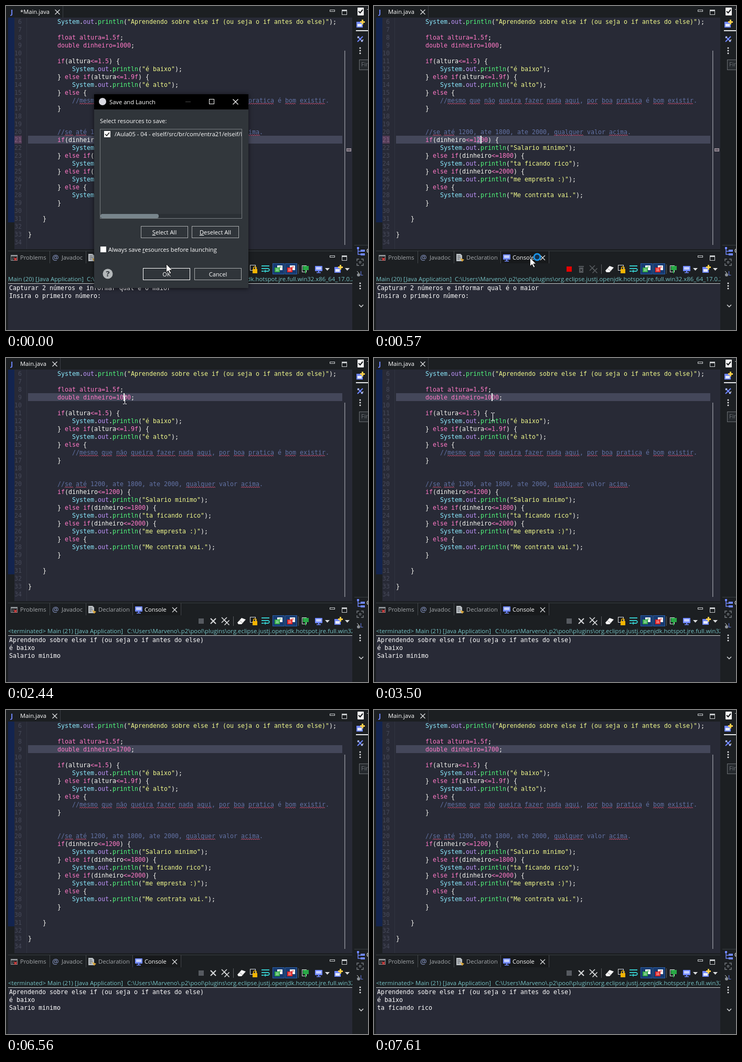
Write an HTML page that moves like this. It is 690x617 px and loops after 8000 ms.

```html
<!DOCTYPE html>
<html lang="pt">
<head>
<meta charset="utf-8">
<title>Editor</title>
<style>
html, body { margin: 0; width: 100%; height: 100%; overflow: hidden; background: #1c1f22; }
svg { display: block; }
text { font: 11.2px "Open Sans", "Noto Sans", sans-serif; white-space: pre; }
.mono { font: 11.63px "DejaVu Sans Mono", "Noto Sans Mono", monospace; }
.path { font-size: 11.35px; }
</style>
</head>
<body>
<svg id="stage" width="690" height="617" viewBox="0 0 690 617"></svg>
<script>
(() => {
const LOOP = 8000, COL = 7, ROW = 15, CODE_X = 42, FIRST = 6;
const C = {
  bg: '#282a36', frame: '#1c1f22', line: '#44475a', text: '#f8f8f2', pink: '#ff79c6',
  cyan: '#8be9fd', purple: '#bd93f9', green: '#50fa7b', yellow: '#f1fa8c',
  comment: '#6272a4', white: '#ffffff', grey: '#a4a8ab', blue: '#7088ff'
};

// ---- drawing helpers
const esc = s => s.replace(/&/g, '&amp;').replace(/</g, '&lt;');
const rect = (x, y, w, h, fill, more = '') =>
  `<rect x="${x}" y="${y}" width="${w}" height="${h}" fill="${fill}" ${more}/>`;
const box = (x, y, w, h, stroke, fill = 'none') =>
  rect(x + .5, y + .5, w - 1, h - 1, fill, `stroke="${stroke}"`);
const line = (d, stroke, width = 1) =>
  `<path d="${d}" fill="none" stroke="${stroke}" stroke-width="${width}"/>`;
const shape = (d, fill, more = '') => `<path d="${d}" fill="${fill}" ${more}/>`;
const disc = (x, y, r, fill) => `<circle cx="${x}" cy="${y}" r="${r}" fill="${fill}"/>`;
const text = (x, y, s, fill = C.white, more = '') =>
  `<text x="${x}" y="${y}" fill="${fill}" ${more}>${esc(s)}</text>`;
const mono = (x, y, s, fill = C.white, more = '') => text(x, y, s, fill, 'class="mono" ' + more);
const at = (x, y, s) => `<g transform="translate(${x} ${y})">${s}</g>`;
const clip = (x, y, w, h, s) =>
  `<svg x="${x}" y="${y}" width="${w}" height="${h}" viewBox="${x} ${y} ${w} ${h}" overflow="hidden">${s}</svg>`;
const cross = (x, y, r, color, w = 1.2) =>
  line(`M${x - r} ${y - r}l${2 * r} ${2 * r}m0 ${-2 * r}l${-2 * r} ${2 * r}`, color, w);
const rowTop = n => 22 + (n - FIRST) * ROW;

// ---- code
const code = amount => [
  '        System.out.println("Aprendendo sobre else if (ou seja o if antes do else)");',
  '',
  '        float altura=1.5f;',
  `        double dinheiro=${amount};`,
  '',
  '        if(altura<=1.5) {',
  '            System.out.println("é baixo");',
  '        } else if(altura<=1.9f) {',
  '            System.out.println("é alto");',
  '        } else {',
  '            //mesmo que não queira fazer nada aqui, por boa pratica é bom existir.',
  '        }',
  '', '',
  '        //se até 1200, ate 1800, ate 2000, qualquer valor acima.',
  '        if(dinheiro<=1200) {',
  '            System.out.println("Salario minimo");',
  '        } else if(dinheiro<=1800) {',
  '            System.out.println("ta ficando rico");',
  '        } else if(dinheiro<=2000) {',
  '            System.out.println("me empresta :)");',
  '        } else {',
  '            System.out.println("Me contrata vai.");',
  '        }',
  '',
  '    }',
  '',
  '}',
  ''
];
const TOKENS = /("[^"]*")|(\/\/.*)|((?:float|double) \w+|\bif\b|\belse\b|<=|=|\d[\d.]*f?)|(System)|(out)|(println)|[^\s\w"]+|\w+/g;
const HUES = [C.yellow, C.comment, C.pink, C.cyan, C.purple, C.green];
const KNOWN = /^(é|ate|valor)$/;

function squiggles(s, start, y) {
  let out = '';
  for (const m of s.matchAll(/[a-zà-ú]+/g)) {
    if (KNOWN.test(m[0])) continue;
    const x = CODE_X + (start + m.index) * COL;
    out += line(`M${x} ${y}` + 'l2 -2l2 2'.repeat(Math.round(m[0].length * COL / 4)), '#d9557a', .9);
  }
  return out;
}

function codeLine(s, n) {
  let out = '';
  const y = rowTop(n) + 12;
  for (const m of s.matchAll(TOKENS)) {
    const hit = m.slice(1).findIndex(Boolean);
    if (hit === 1) out += squiggles(m[0], m.index, y + 3);
    out += mono(CODE_X + m.index * COL, y, m[0], HUES[hit] || C.text);
  }
  return out;
}

// ---- icons
const winButtons = y => box(617, y, 10, 4, '#c9ccce') +
  box(640, y, 10, 10, '#c9ccce') + rect(640, y, 10, 3, '#c9ccce');
const monitor = rect(-7, -6, 14, 10, C.blue, 'rx="1"') + rect(-5, -4, 10, 5, '#c5d0ff') +
  rect(-1, 4, 2, 2, C.blue) + rect(-4, 6, 8, 1.5, C.blue);
const newWindow = rect(-7, -4, 12, 11, C.blue) + rect(-5, 0, 8, 5, '#e8ecff') +
  shape('M3-8h3v3h3v3h-3v3h-3v-3h-3v-3h3z', '#ffcf4a');
const drop = shape('M-4-2h9l-4.5 5z', '#d8dadc');
const dots = y => [0, 5, 10].map(d => disc(675, y + d, 1.5, '#e4e6e8')).join('');
const printer = color => rect(-11, -11, 23, 21, '#173a70') + box(-11, -11, 23, 21, '#2b5fa8') +
  rect(-2, -7, 10, 9, '#f2f4f4') + rect(-7, -3, 10, 9, color) +
  line('M-5 0h6M-5 3h6', '#fff') + line('M1-4h5', color);

function consoleTools(live) {
  const dim = live ? '#55595d' : '#d6d8da';
  const bin = live ? shape('M-5-6h10v2h-10zM-4-3h8v10h-8z', dim) + line('M-2 0l4 4m0-4l-4 4', '#111')
                   : cross(0, 0, 5, dim, 2.2);
  return rect(367, 496, 10, 10, live ? '#e60000' : '#565a60') + at(395, 501, bin) +
    cross(416, 499, 5, dim, 1.7) + cross(421, 504, 4.5, dim, 1.7) +
    rect(433, 492, 1, 18, '#5b5f62') +
    at(449, 501, shape('M-8 3l8-9 8 3-8 9h-6z', '#f4f4f4') + line('M-4-1l7 5', '#999')) +
    at(472, 501, box(-7, -8, 11, 11, '#d8dadc') + rect(-2, 0, 9, 8, '#f4b400') +
      line('M0 0v-3q2.500-3 5 0v3', '#f4b400', 1.6)) +
    at(495, 501, line('M-8-6h15M-8-1h13q4 2.500 0 5h-6M-8 4h4', '#35c8c8', 1.8) + shape('M0 1v6l-4-3z', '#35c8c8')) +
    at(519, 501, printer('#2faa44')) + at(543, 501, printer('#e01f1f')) +
    rect(557, 492, 1, 18, '#5b5f62') +
    at(570, 501, box(-6, -7, 9, 13, '#d8dadc') + rect(-4, -6, 11, 8, '#28a745') + line('M1 2v6', '#28a745', 2)) +
    at(596, 501, monitor) + at(612, 501, drop) + at(633, 501, newWindow) + at(650, 501, drop);
}

// ---- regions
function sidebar() {
  return rect(664, 455, 26, 1, '#3a3e42') +
    rect(670, 3, 12, 15, '#f4f4f4', 'rx="1"') + line('M672 10l3 3 5-6', '#15171a', 2) +
    text(688, 14, 'T') + at(675, 34, newWindow) + rect(667, 46, 23, 2, '#e6e8ea') +
    cross(675, 63, 5, C.blue, 2) + line('M670 61l3-3M677 68l4-4', '#e4e6e8', 1.4) + dots(80) +
    box(673, 102, 30, 20, '#6a6e72', '#25292d') + text(677, 115, 'Fin', '#6c7075') +
    at(675, 467, rect(-6, -8, 4, 4, C.blue) + line('M-4-4v10h5M-4 0h5', C.blue, 1.4) +
      rect(1, -3, 8, 4, C.blue) + rect(1, 4, 8, 4, C.blue)) + text(687, 470, 'C') +
    line('M669 486v-4h4m4 0h4v4m0 4v4h-4m-4 0h-4v-4', '#777c81', 1.4) + box(673, 486, 4, 4, '#777c81') +
    disc(672, 512, 3, '#8d9297') + text(675, 513, 'L', C.blue) + line('M669 505l4 4', '#d0d3d5') +
    dots(528) + line('M673 569l4 4 4-4', '#d6d8da', 1.5);
}

function editor(s) {
  const end = s.dirty ? 109 : 104;
  let out = rect(end - 1, 0, 1, 22, '#3a3e44') +
    text(9, 16, 'J', C.blue, 'style="font-size:13px;font-weight:700"') +
    text(27, 15, (s.dirty ? '*' : '') + 'Main.java') + cross(end - 11, 11.5, 4.5, '#e4e6e8') + winButtons(7) +
    rect(16, 22, 644, 441, C.bg) + rect(4, 22, 12, 390, '#13244f') + rect(39, 22, 1, 441, '#313440') +
    rect(CODE_X, rowTop(s.row), 599, ROW, C.line) + rect(645, 85, 1.5, 370, '#8a8c95');
  if (s.mark) out += rect(16, rowTop(s.mark), 14, ROW, '#553d58') +
    box(649, Math.round(24.5 + s.mark * 11.75), 9, 6, '#aaa2aa', '#6b606c');
  if (s.sel) out += rect(196, rowTop(21), 7, ROW, '#65728a');
  code(s.amount).forEach((str, i) => {
    const n = FIRST + i;
    out += mono(30, rowTop(n) + 12, String(n), n === s.mark ? '#80607f' : '#464959', 'text-anchor="end"') + codeLine(str, n);
  });
  if (s.caret) {
    const x = s.row === 21 ? 203 : 210 + COL * (s.amount.length - 2);
    out += rect(x, rowTop(s.row), 2, ROW, '#f4f4f4');
  }
  return out;
}

const HEADS = { old: 'Main (20) [Java Application] ', fresh: 'Main (21) [Java Application] ' };
const PRINTED = {
  old: ['Capturar 2 números e informar qual é o maior', 'Insira o primeiro número: '],
  fresh: [],
  low: ['Aprendendo sobre else if (ou seja o if antes do else)', 'é baixo', 'Salario minimo'],
  rich: ['Aprendendo sobre else if (ou seja o if antes do else)', 'é baixo', 'ta ficando rico']
};
const JRE = 'C:\\Users\\Marveno\\.p2\\pool\\plugins\\org.eclipse.justj.openjdk.hotspot.jre.full.win32.x86_64_17.0.2';

function consoleView(s) {
  const head = HEADS[s.run], teal = '#76c3c6';
  return rect(4, 466, 656, 1, '#383c40') +
    [83, 152, 241, 333].map(x => rect(x, 467, 1, 23, '#43474b')).join('') +
    box(9, 474, 13, 11, '#8d9296') + rect(9, 474, 13, 3, '#8d9296') + cross(18, 482, 2.5, '#d43d3d', 1.8) +
    line('M11 480h4M11 483h3', '#8d9296') + text(27, 483, 'Problems', C.grey) +
    text(88, 484, '@', '#8f9fd0', 'style="font-size:14px"') + text(106, 483, 'Javadoc', C.grey) +
    shape('M157 472h8l3 3v11h-11z', '#b9bec2') + line('M159 476h5M159 479h6M159 482h4', '#50555a') +
    shape('M164 480l8 3-4 4z', '#d8a53a') + text(176, 483, 'Declaration', C.grey) +
    rect(242, 467, 91, 23, '#17191b') +
    at(253, 479, monitor) + text(264, 483, 'Console') + cross(321.5, 479.5, 4.5, '#e4e6e8') + winButtons(475) +
    consoleTools(s.live) +
    clip(4, 512, 656, 16, text(4, 524, head || '<terminated> ' + HEADS.fresh, teal, 'class="path"') +
      text(head ? 154 : 231, 524, JRE, teal, 'class="path"')) +
    rect(4, 528, 656, 1, '#c8cccc') + rect(4, 529, 656, 88, C.bg) +
    PRINTED[s.run].map((str, i) => mono(6, 541 + i * ROW, str)).join('');
}

function button(x, y, label, edge, key = '') {
  const body = key ? `<tspan text-decoration="underline">${key}</tspan>${label.slice(1)}` : label;
  return box(x, y, 90, 23, edge, '#30353a') +
    `<text x="${x + 45}" y="${y + 16}" fill="#fff" text-anchor="middle">${body}</text>`;
}

function dialog(s) {
  return rect(168, 168, 294, 369, '#30353a', 'style="filter:drop-shadow(0 1px 4px #0009)"') +
    rect(168, 168, 294, 29, '#000') + disc(184, 182, 7, '#d8d8e0') + text(197, 186.5, 'Save and Launch') +
    rect(342, 182, 10, 1, '#4a4a4a') + box(387, 177, 10, 10, '#fff') + cross(437.5, 182.5, 5, '#fff') +
    text(179, 223, 'Select resources to save:') + box(179, 234, 271, 171, '#777c80', '#32373c') +
    rect(187, 238, 12, 12, '#fff') + line('M189 244l3 3 5-6', '#222', 1.7) +
    clip(180, 235, 269, 20, text(207, 248, '/Aula05 - 04 - elself/src/br/com/entra21/elseif/Main.java')) +
    rect(180, 396, 269, 8, '#2b3035') + rect(180, 396, 111, 8, '#78858c', 'rx="3.5"') +
    button(257, 419, 'Select All', '#a8abad', 'S') + button(354, 419, 'Deselect All', '#a8abad', 'D') +
    rect(180, 458, 11, 11, '#fff') +
    '<text x="195" y="468" fill="#fff">Always save <tspan text-decoration="underline">r</tspan>esources before launching</text>' +
    disc(194, 510, 9.5, '#b4b8ba') + text(194, 515, '?', '#30353a', 'text-anchor="middle" style="font-size:15px;font-weight:700"') +
    button(261, 499, 'OK', s.press ? '#c8cacc' : '#fff') + button(359, 499, 'Cancel', '#a8abad');
}

function pointer(s) {
  if (s.cursor === 'arrow') return at(s.x, s.y,
    shape('M.5.5v16l3.8-3.5 3 6 2.5-1.2-3-5.8h5z', '#fff', 'stroke="#000" stroke-width=".8"')) +
    (s.busy ? '<circle cx="311" cy="478" r="6" fill="#12304d" stroke="#1c93e6" stroke-width="3"/>' : '');
  if (s.cursor === 'beam') return at(s.x, s.y, line('M-3-7.5h2.5l1 1 1-1h2.5M.5-7v14M-3 7.5h2.5l1-1 1 1h2.5', '#fff'));
  return '';
}

// ---- timeline: each step changes part of the state
const STEPS = [
  [0, { dialog: 1, dirty: 1, row: 21, mark: 21, sel: 1, caret: 1, amount: '1000', run: 'old', live: 1, cursor: 'arrow', x: 305, y: 491 }],
  [120, { x: 329, y: 497 }],
  [270, { y: 503, press: 1 }],
  [410, { dialog: 0, dirty: 0, x: 297, y: 479, busy: 1 }],
  [700, { run: 'fresh' }],
  [830, { run: 'low', live: 0, busy: 0, cursor: 'beam', x: 238, y: 205 }],
  [980, { x: 235, y: 190 }],
  [1100, { x: 231, y: 185, caret: 0 }],
  [1250, { mark: 0 }],
  [1530, { y: 165 }],
  [1650, { y: 157 }],
  [1800, { y: 140, caret: 1 }],
  [1930, { x: 230, y: 120 }],
  [2050, { x: 228, y: 100 }],
  [2180, { x: 227, y: 83, caret: 0 }],
  [2320, { row: 9, sel: 0, caret: 1 }],
  [2440, { x: 226, y: 80 }],
  [2590, { y: 112 }],
  [2870, { caret: 0 }],
  [3500, { caret: 1 }],
  [3750, { amount: '100', dirty: 1, mark: 9 }],
  [3890, { amount: '1700' }],
  [4570, { cursor: 'arrow', x: 100, y: -11 }],
  [4700, { cursor: '' }],
  [4950, { caret: 0 }],
  [5470, { caret: 1 }],
  [5850, { dirty: 0 }],
  [6410, { caret: 0 }],
  [6560, { mark: 0 }],
  [6680, { run: 'fresh', live: 1 }],
  [6940, { run: 'rich' }],
  [7090, { live: 0, caret: 1 }],
  [7610, { caret: 0 }]
];

const stage = document.getElementById('stage');
let shown = -1;

function tick() {
  const t = performance.now() % LOOP;
  const past = STEPS.filter(([start]) => start <= t);
  if (past.length !== shown) {
    shown = past.length;
    const s = Object.assign({}, ...past.map(step => step[1]));
    stage.innerHTML = rect(0, 0, 690, 617, C.frame) + editor(s) + consoleView(s) + sidebar() +
      (s.dialog ? dialog(s) : '') + pointer(s);
  }
  requestAnimationFrame(tick);
}
tick();
})();
</script>
</body>
</html>
```
